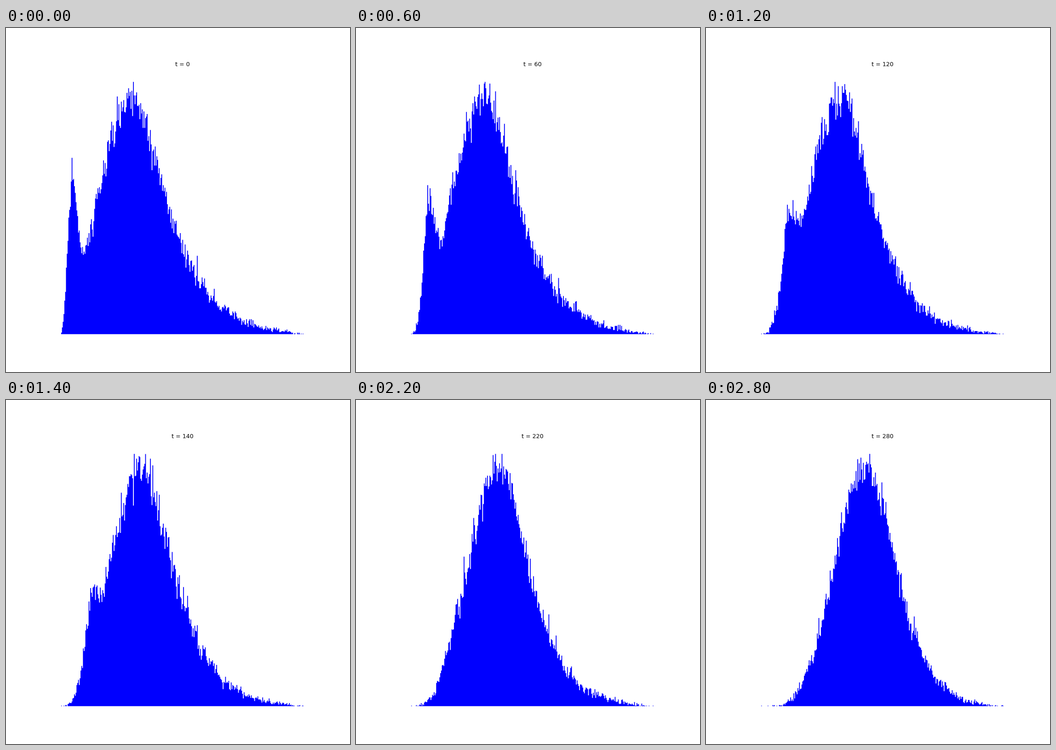
These frames come from a looping animation (748 by 748 pixels, 3 s). A matplotlib script:

```python
import numpy as np
import matplotlib.pyplot as plt
from matplotlib.animation import FuncAnimation

FRAMES, INTERVAL, DT = 15, 200, 20
BINS = 300
X0, X1, TOP = 119.85, 646.65, 548.0   # histogram area in stage pixels
UNIT = 1.12                           # height of a single sample
HUMP_H, HUMP_LEFT = 515, 68

x = X0 + (np.arange(BINS) + 0.5) * (X1 - X0) / BINS


def drift(step, start, late, end):
    return np.interp(step, [1, 11, 14], [start, late, end])


def gauss(d, width):
    return np.exp(-0.5 * (d / width) ** 2)


def hump(step):
    """Main mode: Gaussian on the left, hyperbolic decay on the right."""
    center = drift(step, 272, 312, 348)
    decay = drift(step, 0.79, 1.13, 2.2)
    scale = drift(step, 55, 60, 90)
    rise = drift(step, 10, 55, 75)
    d = x - center
    left = gauss(d, HUMP_LEFT) * (1 - np.exp(-((x - X0) / rise) ** 2))
    right = np.exp(-decay * (np.hypot(1, d / scale) - 1))
    right *= 1 - (d / (X1 - center)) ** 8
    return HUMP_H * np.where(d < 0, left, right)


def bump(step):
    """Small early mode that moves right and melts into the hump."""
    d = x - drift(step, 143, 215, 230)
    width = np.where(d < 0, drift(step, 8, 14, 14), drift(step, 11, 15, 15))
    return drift(step, 250, 15, 0) * gauss(d, width)


def histogram(step):
    rng = np.random.default_rng(100 + step)
    heights = rng.poisson((hump(step) + bump(step)) / UNIT) * UNIT
    heights[[0, -1]] = np.maximum(heights[[0, -1]], UNIT)
    heights = np.minimum(heights, TOP)
    heights[np.argmax(heights)] = TOP
    return heights / TOP


side = 25 / 2.54   # 25 cm, 748 px at 76 dpi
fig, ax = plt.subplots(figsize=(side, side), dpi=76)
ax.set_axis_off()
ax.set_xlim(-0.05 * BINS, 1.05 * BINS)
ax.set_ylim(0, 1.05)
steps = ax.stairs(histogram(0), np.arange(BINS + 1), fill=True,
                  color="#0000ff", snap=False)
title = ax.set_title("t = 0", fontsize=12, fontfamily="DejaVu Sans")


def update(step):
    steps.set_data(histogram(step))
    title.set_text(f"t = {step * DT}")
    return steps, title


anim = FuncAnimation(fig, update, frames=FRAMES, interval=INTERVAL,
                     repeat=True, repeat_delay=0, blit=False)
plt.show()
```
